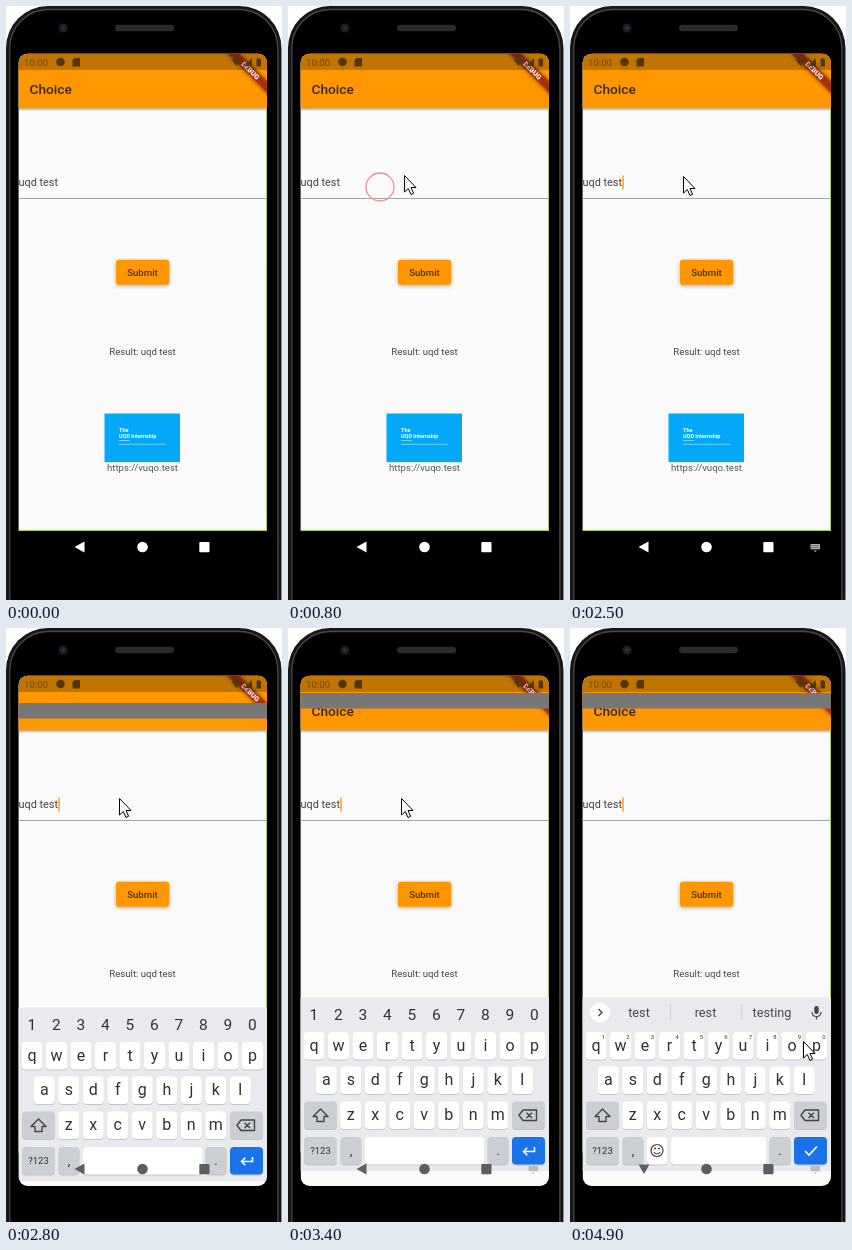
An HTML page for the animation above (5000 ms loop, 276 by 594 pixels).

```html
<!DOCTYPE html>
<html lang="en">
<head>
<meta charset="utf-8">
<title>Choice app demo</title>
<style>
html, body { margin: 0; width: 100%; height: 100%; overflow: hidden; background: #fff; }
svg { display: block; width: 276px; height: 594px; font-family: Roboto, "Open Sans", sans-serif; }
.mid { text-anchor: middle; }
.blur { filter: blur(2px); }
.anim { animation: 5s step-end infinite; }
.pointer { animation-name: pointer; }
.tap1 { animation-name: tap1; }
.tap2 { animation-name: tap2; }
.caret { animation-name: caret; }
.ime { animation-name: ime; }
.ime-late { animation-name: ime-late; }
.board { animation-name: board; }
.slide { animation-name: slide; }
.before { animation-name: before; }
.after { animation-name: after; }
.words { animation-name: words; }

@keyframes pointer {
  0% { opacity: 0; transform: translate(210px, 74px); }
  6% { opacity: 1; transform: translate(202px, 80px); }
  8% { opacity: 1; transform: translate(172px, 112px); }
  10% { opacity: 1; transform: translate(140px, 143px); }
  12% { opacity: 1; transform: translate(122px, 161px); }
  14% { opacity: 1; transform: translate(117px, 170px); }
  34% { opacity: 1; transform: translate(114px, 171px); }
  92% { opacity: 1; transform: translate(134px, 212px); }
  94% { opacity: 1; transform: translate(174px, 293px); }
  96% { opacity: 1; transform: translate(216px, 378px); }
  98%, 100% { opacity: 1; transform: translate(234px, 414px); }
}
@keyframes tap1 { 0% { opacity: 0; } 16% { opacity: 1; } 20%, 100% { opacity: 0; } }
@keyframes tap2 { 0% { opacity: 0; } 34% { opacity: 1; } 38%, 100% { opacity: 0; } }
@keyframes caret { 0% { opacity: 0; } 40%, 100% { opacity: 1; } }
@keyframes ime { 0% { opacity: 0; } 42%, 100% { opacity: 1; } }
@keyframes ime-late { 0% { opacity: 0; } 60%, 100% { opacity: 1; } }
@keyframes board { 0% { opacity: 0; } 56%, 100% { opacity: 1; } }
@keyframes slide {
  0% { transform: translateY(10px); }
  58% { transform: translateY(4px); }
  60% { transform: translateY(1px); }
  62%, 100% { transform: none; }
}
@keyframes before { 0% { opacity: 1; } 72%, 100% { opacity: 0; } }
@keyframes after { 0% { opacity: 0; } 72%, 100% { opacity: 1; } }
@keyframes words { 0% { opacity: 0; } 82%, 100% { opacity: 1; } }
</style>
</head>
<body>
<svg viewBox="0 0 276 594">
  <defs>
    <clipPath id="screen"><rect x="12.600" y="47.700" width="248.400" height="510.300" rx="9"/></clipPath>
    <linearGradient id="shade" x2="0" y2="1">
      <stop stop-color="#000" stop-opacity=".3"/><stop offset="1" stop-color="#000" stop-opacity="0"/>
    </linearGradient>
    <path id="imeIcon" d="M240.500 538h9.500v5.300h-9.500zM243.500 544.500h3.500l-1.750 1.500z"/>
  </defs>

  <!-- phone -->
  <rect width="275.500" height="660" rx="42" fill="#161616"/>
  <rect x="3.800" y="3.500" width="268" height="660" rx="38.500" fill="#000" stroke="#474747" stroke-width="1.300"/>
  <circle cx="57" cy="22" r="4.500" fill="#1b1e22"/>
  <circle cx="57" cy="22" r="1.800" fill="#2c3442"/>
  <rect x="109" y="18.800" width="59" height="6.400" rx="3.200" fill="#2b2b2b"/>

  <g clip-path="url(#screen)">
    <!-- page -->
    <rect x="12" y="47" width="249" height="477" fill="#fafafa"/>
    <rect x="12" y="102" width="249" height="3.500" fill="url(#shade)"/>
    <rect x="12" y="47" width="249" height="55.300" fill="#ff9800"/>
    <path d="M260.500 103V524.400H12" fill="none" stroke="#b2cd5e" stroke-width="1.200"/>
    <text x="23.500" y="88.300" font-size="13.700" font-weight="500" fill="#3a2a10">Choice</text>

    <g transform="translate(261 48) rotate(45)">
      <rect class="blur" x="-40" y="19.300" width="80" height="8.300" opacity=".5"/>
      <rect x="-40" y="19.300" width="80" height="8.300" fill="#b71c1c" opacity=".63"/>
      <text class="mid" y="25.900" font-size="7" font-weight="900" fill="#fff">DEBUG</text>
    </g>

    <rect x="12" y="47" width="249" height="17" opacity=".24"/>
    <g fill="#553608">
      <text x="18" y="59.700" font-size="9.650" fill="#70480d">10:00</text>
      <circle cx="54.500" cy="56" r="4.300"/>
      <path d="M68.500 52h5.500v8.500h-7.500v-6.500z"/>
      <path d="M225.500 53.500q5-3 10 0l-5 6.500z"/>
      <path d="M246 52v8h-8z"/>
      <path d="M250.500 53h1v-1h2v1h1.500v7.500h-4.500z"/>
    </g>

    <text x="12.500" y="180" font-size="10.900" fill="#444">uqd test</text>
    <path d="M12 192.500H260" stroke="#a4a4a4"/>
    <rect class="anim caret" x="52.300" y="169.500" width="1.400" height="14" fill="#ff9800"/>

    <rect class="blur" x="110" y="255" width="53" height="25" rx="3" opacity=".3"/>
    <rect x="110" y="253.700" width="53.200" height="25" rx="2.800" fill="#ff9800"/>
    <text class="mid" x="136.500" y="269.700" font-size="9.650" font-weight="500" fill="#4a340f">Submit</text>
    <text class="mid" x="136.500" y="349" font-size="9.650" fill="#444">Result: uqd test</text>

    <rect x="98.500" y="407.500" width="75.500" height="48.700" fill="#03a9f8"/>
    <g fill="#fff" font-size="5.500" font-weight="700">
      <text x="113" y="425.800">The</text>
      <text x="113" y="431.800">UQD Internship</text>
      <path d="M113 434.500h11" stroke="#fff" stroke-width=".8" opacity=".65"/>
      <path d="M113 438.300h47" stroke="#fff" stroke-width=".8" opacity=".55"/>
    </g>
    <text class="mid" x="136.500" y="465" font-size="9.650" fill="#555">https://vuqo.test</text>

    <!-- system bar -->
    <rect x="12" y="525" width="249" height="34"/>
    <g fill="#fff">
      <path d="M78.500 535.500v11l-10-5.500z"/>
      <circle cx="136.500" cy="541" r="5.300"/>
      <rect x="193.300" y="536" width="10.200" height="10.200" rx="1"/>
      <g class="anim ime">
        <use href="#imeIcon" fill="#b4b4b4"/>
        <path d="M241.500 539.500h8M241.500 541.500h8" stroke="#000" stroke-width=".8" stroke-dasharray="1 1"/>
      </g>
    </g>

    <!-- keyboard -->
    <g class="anim board">
      <rect x="12" y="525" width="249" height="34" fill="#fafafa"/>
      <g class="anim slide">
        <rect x="12" y="65" width="249" height="15.500" fill="#777"/>
        <rect x="12" y="369.500" width="249" height="173.500" fill="#e8eaed"/>
        <g id="keys"></g>
        <g id="numbers" class="anim before"></g>
        <g id="hints" class="anim after"></g>
        <g fill="none" stroke="#444" stroke-width="1.400" stroke-linejoin="round">
          <path d="M32.500 481l7.500 7.500h-4v5h-7v-5h-4z"/>
          <path d="M235 482h13.500v10.500H235l-4-5.250zM238.500 484.700l5.500 5.200m0-5.200l-5.500 5.200"/>
        </g>
        <path class="anim before" d="M246.500 519v4.500h-11m3.800-3.800l-3.800 3.800 3.800 3.800" fill="none" stroke="#fff" stroke-width="1.600"/>
        <g class="anim after">
          <path d="M235 523l4 4 8-8.500" fill="none" stroke="#fff" stroke-width="1.700"/>
          <g fill="none" stroke="#444" stroke-width="1.200">
            <circle cx="87" cy="522.500" r="6"/>
            <path d="M83.800 524q3.200 4 6.400 0"/>
          </g>
          <path d="M84 520.500h2m2 0h2" stroke="#444" stroke-width="1.700"/>
          <circle cx="30" cy="384.500" r="10" fill="#fff"/>
          <path d="M28.500 381l3.500 3.500-3.500 3.500" fill="none" stroke="#444" stroke-width="1.400"/>
          <rect x="244.300" y="378" width="4.400" height="8" rx="2.200" fill="#444"/>
          <path d="M242 384q0 4.500 4.500 4.500t4.500-4.500M246.500 388.500v3" fill="none" stroke="#444" stroke-width="1.200"/>
        </g>
        <g class="anim words">
          <path d="M100.500 376v16M171.500 376v16" stroke="#cdd0d4"/>
          <g class="mid" font-size="12.700" fill="#45484c">
            <text x="69" y="389">test</text>
            <text x="135.500" y="389">rest</text>
            <text x="202" y="389">testing</text>
          </g>
        </g>
      </g>
      <g fill="#5c5e61">
        <path class="anim before" d="M78.500 535.500v11l-10-5.500z"/>
        <path class="anim after" d="M68.500 536.500h11l-5.500 9.500z"/>
        <circle cx="136.500" cy="541" r="5.300"/>
        <rect x="193.300" y="536" width="10.200" height="10.200" rx="1"/>
        <use class="anim ime-late" href="#imeIcon" fill="#b9bbbe"/>
      </g>
    </g>
  </g>

  <g fill="none" stroke="#ec8f8c" stroke-width="1.300">
    <circle class="anim tap1" cx="92" cy="181" r="14"/>
    <circle class="anim tap2" cx="89" cy="182" r="14"/>
  </g>
  <g class="anim pointer">
    <path d="M-.5 -.5V16L3.300 12.500l2.700 6 2.600-1.200L6 11.500H11Z" fill="#fff" stroke="#000"/>
  </g>
</svg>
<script>
const NS = 'http://www.w3.org/2000/svg';
const step = 24.5;
const get = id => document.getElementById(id);
const keys = get('keys'), numbers = get('numbers'), hints = get('hints');

function add(parent, tag, attrs, text) {
  const el = document.createElementNS(NS, tag);
  for (const k in attrs) el.setAttribute(k, attrs[k]);
  if (text) el.textContent = text;
  parent.appendChild(el);
}

function cap(parent, x, y, w, fill) {
  const box = { x, width: w, height: 27.5, rx: 4 };
  add(parent, 'rect', { ...box, y: y + 1, fill: '#c2c5ca' });
  add(parent, 'rect', { ...box, y, fill });
}

function label(parent, x, y, size, text) {
  add(parent, 'text', { x, y, class: 'mid', 'font-size': size, fill: '#2f3134' }, text);
}

const rows = [['qwertyuiop', 26, 404], ['asdfghjkl', 38.3, 438.5], ['zxcvbnm', 62.7, 473.5]];
for (const [letters, start, y] of rows) {
  [...letters].forEach((c, i) => {
    const x = start + i * step;
    cap(keys, x - 10.5, y, 21, '#fff');
    label(keys, x, y + 18.5, 16, c);
  });
}

const grey = '#cbced3';
cap(keys, 16, 473.5, 33, grey);
cap(keys, 224, 473.5, 33, grey);
cap(keys, 16, 509, 33, grey);
cap(keys, 52.5, 509, 21, grey);
cap(keys, 199.5, 509, 21, grey);
cap(keys, 224, 509, 33, '#1a73e8');
label(keys, 32.5, 526, 9.5, '?123');
label(keys, 63, 527, 13, ',');
label(keys, 210, 527, 13, '.');

cap(numbers, 77, 509, 119.5, '#fff');
cap(hints, 77, 509, 20.5, '#fff');
cap(hints, 101, 509, 95.5, '#fff');
[...'1234567890'].forEach((d, i) => {
  label(numbers, 25.8 + i * step, 391.5, 15.5, d);
  label(hints, 33.5 + i * step, 411, 6, d);
});
</script>
</body>
</html>
```
